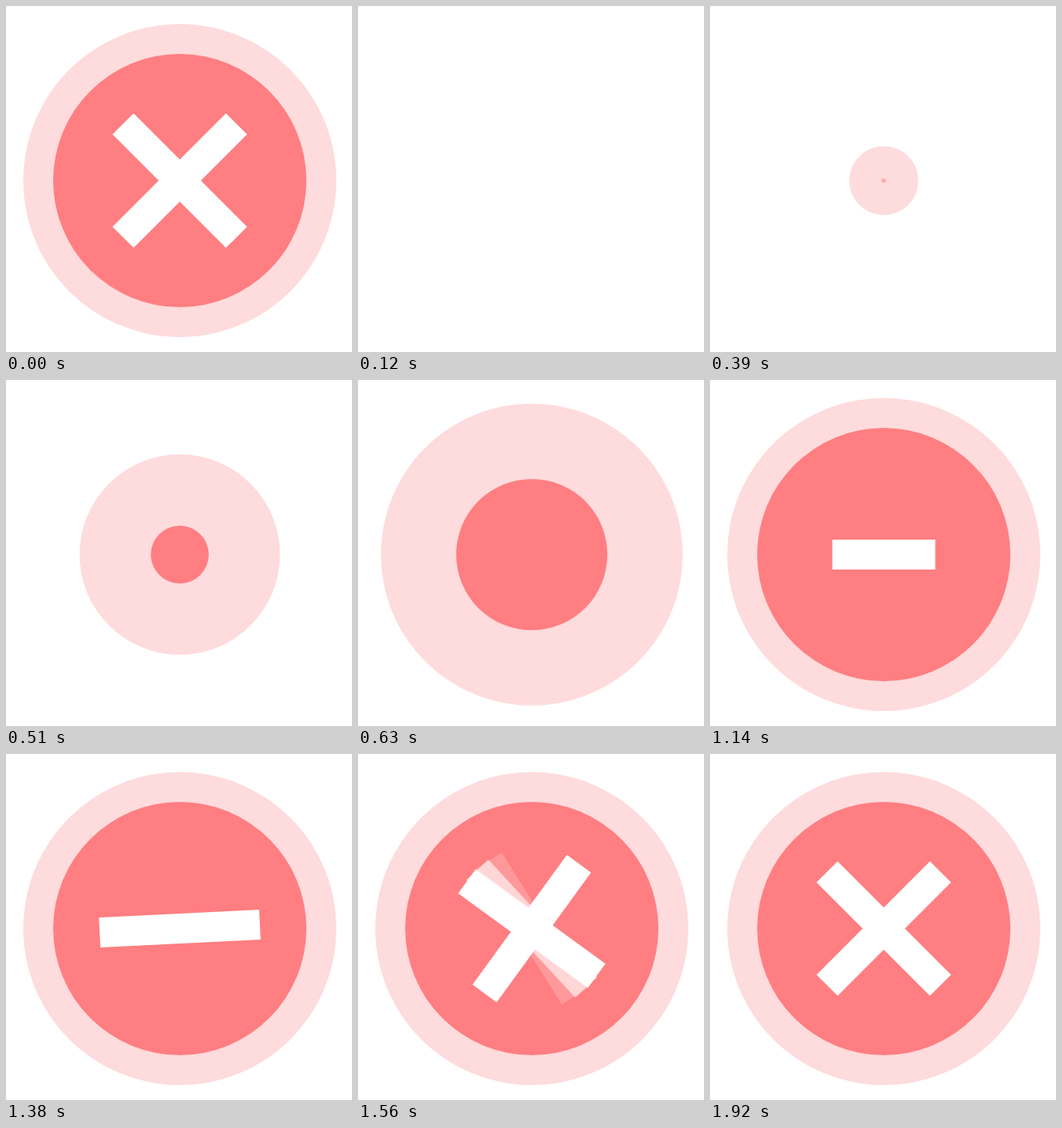
Write an HTML page with a canvas that moves like this. It is 440x440 px and loops after 2.25 s.

```html
<!DOCTYPE html>
<html lang="en">
<head>
<meta charset="utf-8">
<title>Error badge</title>
<style>
  html, body { margin: 0; width: 100%; height: 100%; overflow: hidden; background: #fff; }
  canvas { display: block; }
</style>
</head>
<body>
<canvas id="stage" width="440" height="440"></canvas>
<script>
const ctx = document.getElementById('stage').getContext('2d');
const LOOP = 2250, STEP = 30;
const CENTER = { x: 221, y: 222 };
const OUTER = { radius: 199, color: '#fedbdc' };
const INNER = { radius: 161, color: '#ff7e81' };
const BAR = { length: 204, width: 38 };

const ramp = (t, start, duration) => Math.min(1, Math.max(0, (t - start) / duration));
const ease = (t, start, duration) => {
  const s = ramp(t, start, duration);
  return s * s * (3 - 2 * s);
};

function disc(radius, color, alpha = 1) {
  if (radius <= 0 || alpha <= 0) return;
  ctx.globalAlpha = alpha;
  ctx.fillStyle = color;
  ctx.beginPath();
  ctx.arc(0, 0, radius, 0, Math.PI * 2);
  ctx.fill();
}

function bar(degrees, length, alpha = 1) {
  if (length <= 0 || alpha <= 0) return;
  ctx.save();
  ctx.globalAlpha = alpha;
  ctx.fillStyle = '#fff';
  ctx.rotate(degrees * Math.PI / 180);
  ctx.fillRect(-length / 2, -BAR.width / 2, length, BAR.width);
  ctx.restore();
}

const spin = t => -135 * ease(t, 1335, 520);
const crossAlpha = t => ramp(t, 1485, 75);

function drawCross(t) {
  // The second bar fades in mid-spin and briefly leaves a trail.
  const linger = 1 - ramp(t, 1560, 60);
  for (const lag of [2 * STEP, STEP]) {
    bar(spin(t - lag) - 90, BAR.length, crossAlpha(t - lag) * linger);
  }
  bar(spin(t) - 90, BAR.length, crossAlpha(t));
  bar(spin(t), BAR.length * ease(t, 866, 460));
}

function draw(time) {
  const clock = Math.floor((time % LOOP) / STEP) * STEP;
  // The finished badge opens the loop, then everything is rebuilt.
  const t = clock < 120 ? LOOP : clock;

  ctx.setTransform(1, 0, 0, 1, 0, 0);
  ctx.globalAlpha = 1;
  ctx.fillStyle = '#fff';
  ctx.fillRect(0, 0, 440, 440);
  ctx.translate(CENTER.x, CENTER.y);

  disc(OUTER.radius * ease(t, 265, 412), OUTER.color);
  disc(2 + (INNER.radius - 2) * ease(t, 370, 463), INNER.color, ramp(t, 370, 40));
  drawCross(t);
}

const start = performance.now();
function tick() {
  draw(performance.now() - start);
  requestAnimationFrame(tick);
}
tick();
</script>
</body>
</html>
```
